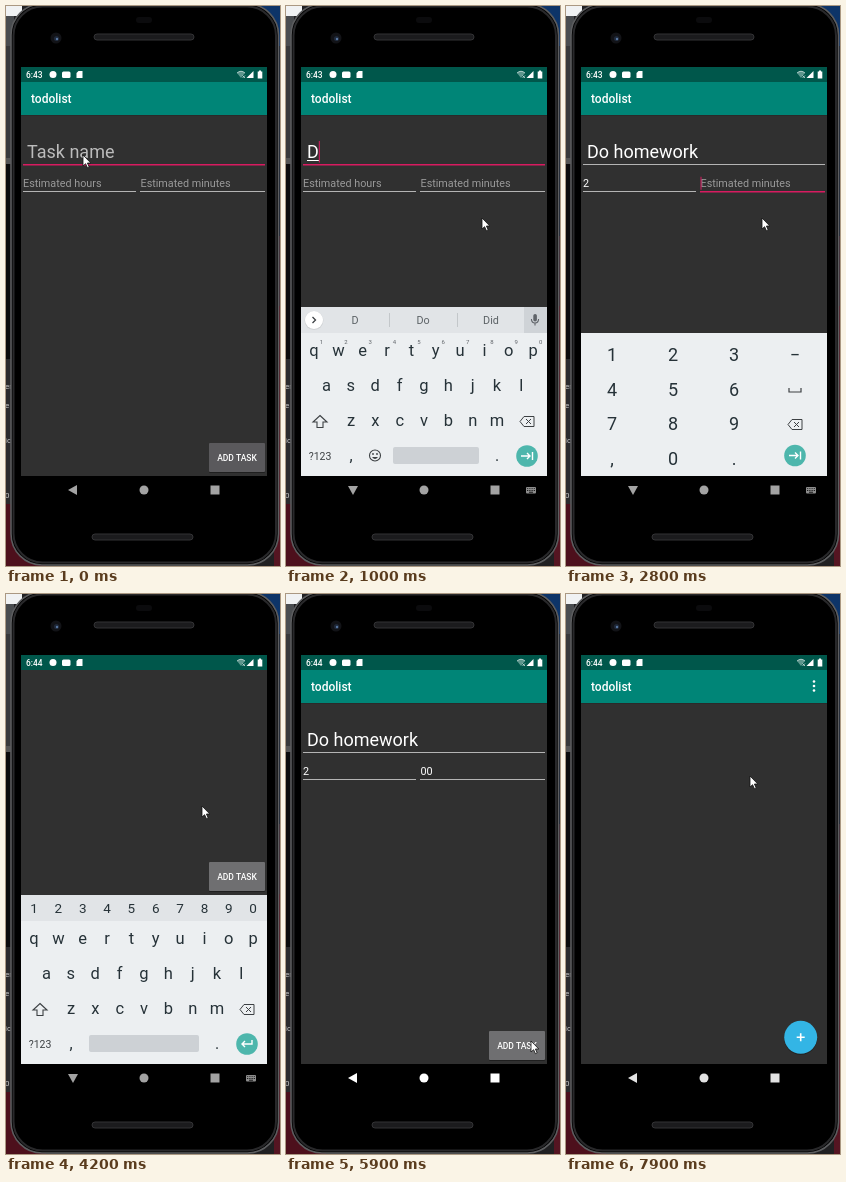
Animation of 274 by 560 pixels, one loop 8000 ms. Source, as an HTML page with a canvas:

```html
<!DOCTYPE html>
<html lang="en">
<head>
<meta charset="utf-8">
<title>Adding a task</title>
<style>
html, body { margin: 0; width: 100%; height: 100%; overflow: hidden; background: #000; }
canvas { display: block; width: 274px; height: 560px; }
</style>
</head>
<body>
<canvas id="stage"></canvas>
<script>
const LOOP = 8000, W = 274, H = 560;
const dpr = window.devicePixelRatio || 1;
const INK = '#3c4043', PINK = '#d81b60', TEAL = '#4db6ac';

function setup(canvas) {
  canvas.width = W * dpr;
  canvas.height = H * dpr;
  const ctx = canvas.getContext('2d');
  ctx.scale(dpr, dpr);
  return ctx;
}
const buffer = setup(document.createElement('canvas'));
let c = setup(document.getElementById('stage'));

// Drawing helpers
const clamp = v => Math.max(0, Math.min(1, v));
const span = (t, a, b) => clamp((t - a) / (b - a));
const smooth = k => k * k * (3 - 2 * k);

function box(x, y, w, h, fill, r = 0, stroke, lw = 1) {
  c.beginPath();
  c.roundRect(x, y, w, h, r);
  if (fill) { c.fillStyle = fill; c.fill(); }
  if (stroke) { c.strokeStyle = stroke; c.lineWidth = lw; c.stroke(); }
}
function dot(x, y, r, fill) {
  c.beginPath();
  c.arc(x, y, r, 0, 7);
  c.fillStyle = fill;
  c.fill();
}
function text(s, x, y, size, fill, align = 'left', weight = 400) {
  c.font = `${weight} ${size}px Roboto, sans-serif`;
  c.textAlign = align;
  c.textBaseline = 'alphabetic';
  c.fillStyle = fill;
  c.fillText(s, x, y);
  return c.measureText(s).width;
}
function shape(d, x, y, fill, stroke, lw = 1) {
  layer(() => {
    c.translate(x, y);
    const p = new Path2D(d);
    if (fill) { c.fillStyle = fill; c.fill(p); }
    if (stroke) { c.strokeStyle = stroke; c.lineWidth = lw; c.stroke(p); }
  });
}
function layer(draw, alpha = 1) {
  c.save();
  c.globalAlpha *= alpha;
  draw();
  c.restore();
}
// Fades a whole drawing as one surface
function group(draw, alpha) {
  const main = c;
  c = buffer;
  c.clearRect(0, 0, W, H);
  draw();
  c = main;
  layer(() => c.drawImage(buffer.canvas, 0, 0, W, H), alpha);
}
function clip(x, y, w, h) {
  c.beginPath();
  c.rect(x, y, w, h);
  c.clip();
}

// Desktop and phone body
function drawDesk() {
  box(0, 0, W, H, '#202022');
  box(0, 0, 16, 10, '#f0f2f3');
  box(0, 10, 8, 30, '#4a4d50');
  box(0, 40, 8, 112, '#38393b');
  box(0, 152, 8, 6, '#555');
  box(0, 158, 8, 195, '#0b0b0c');
  box(0, 353, 8, 145, '#2b2b2d');
  box(0, 498, 40, 62, '#4d101c');
  [['er', 383], ['e', 402], ['ic', 437], ['0', 492]].forEach(([s, y]) => text(s, -1, y, 8, '#c8c8c8'));
  box(250, 0, 24, 40, '#0d3468');
  box(268, 40, 6, 190, '#101a2c');
  box(268, 230, 6, 70, '#3a2430');
  box(268, 300, 6, 260, '#551522');
}
function drawPhone() {
  box(5, -2, 267.5, 561, '#000', 31, '#5c5d5f', 1.6);
  box(7.5, .5, 262.5, 556, null, 29, '#29292b', 2);
  dot(50, 32, 5.5, '#121317');
  dot(50.5, 32.5, 2.6, '#1f2838');
  dot(51, 33, 1.2, '#5876a0');
  box(130, 11, 16, 6, '#0b0b0d', 3);
  box(88, 28, 100, 6, '#1b1b1d', 3, '#333335');
  box(86, 528, 101, 6, '#1b1b1d', 3, '#333335');
}

function drawStatus(t) {
  box(15, 61, 246, 15, '#00574b');
  text(t < 3300 ? '6:43' : '6:44', 20, 72, 8.4, '#fff', 'left', 500);
  dot(47, 68.5, 3.5, '#fff');
  box(56, 65.5, 8.5, 6.5, '#fff', 1.5);
  shape('M-1 -3.5H3V3.5H-3V-1.5Z', 73.5, 68.5, '#fff');
  shape('M-4 -1.5Q0 -5 4 -1.5L0 3.5Z', 235, 68.5, '#5d968d');
  shape('M-4 -1.5Q0 -5 4 -1.5M1.5 1L4 3.5M4 1L1.5 3.5', 235, 68.5, null, '#d5e4e2', .8);
  shape('M3.5 -3.5V3.5H-3.5Z', 244, 68.5, '#fff');
  shape('M-1 -4H1V-3H2.3V4H-2.3V-3H-1Z', 254, 68.5, '#fff');
}

// App screens
function drawBar() {
  box(15, 76, 246, 394, '#303030');
  box(15, 76, 246, 33, '#008577');
  box(15, 109, 246, 1, 'rgba(0,0,0,.12)');
  text('todolist', 25, 97, 12, '#fff', 'left', 500);
}
function field(value, hint, x, base, size, line, x1, x2, focused, caret) {
  const w = text(value || hint, x, base, size, value ? '#fff' : size > 12 ? '#bcbcbc' : '#999');
  box(x1, line, x2 - x1, focused ? 1.6 : 1, focused ? PINK : '#b4b4b4');
  if (caret) box(x + (value ? w : 0), base - size * .95, 1, size * 1.2, PINK);
}
function drawForm(t) {
  const focus = t < 2000 ? 0 : t < 2800 ? 1 : t < 3600 ? 2 : 3;
  const name = t < 1000 ? '' : 'Do homework'.slice(0, 1 + Math.floor((t - 1000) / 90));
  drawBar();
  field(name, 'Task name', 21, 152, 18, 158, 17, 259, focus === 0, focus === 0 && t > 200);
  if (name && focus === 0) {
    const from = name.lastIndexOf(' ') + 1;
    c.font = '400 18px Roboto, sans-serif';
    const start = c.measureText(name.slice(0, from)).width;
    box(21 + start, 154, c.measureText(name.slice(from)).width, 1, '#fff');
  }
  field(t < 2500 ? '' : '2', 'Estimated hours', 17, 181, 10.8, 185, 17, 130, focus === 1, focus === 1);
  field(t < 3000 ? '' : t < 3100 ? '0' : '00', 'Estimated minutes', 134.5, 181, 10.8, 185, 134, 259, focus === 2, focus === 2);
  box(203, 438, 56, 29, 'rgba(0,0,0,.35)', 1);
  box(203, 437, 56, 29, focus === 3 ? '#6f6f71' : '#5a595c', 1);
  if (t > 6000) {
    layer(() => {
      clip(203, 437, 56, 29);
      dot(246, 450, 50 * span(t, 6000, 6250), '#fff');
    }, .25 * (1 - span(t, 6250, 6500)));
  }
  text('ADD TASK', 231, 455, 8.5, '#fff', 'center', 500);
}
function drawList() {
  drawBar();
  [87.5, 92, 96.5].forEach(y => dot(248, y, 1.3, '#fff'));
  dot(234.7, 444.5, 16.5, 'rgba(0,0,0,.25)');
  dot(234.7, 443.3, 16.5, '#33b5e5');
  shape('M-4 0H4M0 -4V4', 234.7, 443.3, null, '#fff', 1.6);
}

// Keyboard
function backspace(x, y) {
  shape('M-7 0L-3 -5H7V5H-3ZM-1 -2.5L4 2.5M4 -2.5L-1 2.5', x, y, null, INK);
}
function action(x, y, enter) {
  dot(x, y, 10.8, TEAL);
  shape(enter ? 'M5 -4V0H-5M-2 -3L-5 0L-2 3' : 'M-6 0H3M0 -3L3 0L0 3M5.5 -4V4', x, y, null, '#fff', 1.4);
}
function suggestions(t) {
  if (t < 1000) return [];
  if (t < 1090) return ['D', 'Do', 'Did'];
  if (t < 1270) return ['Do', 'Does', 'Done'];
  if (t < 1540) return ['home', 'how', 'house'];
  return ['homework', 'home', 'homes'];
}
function drawNumbers() {
  box(15, 327, 246, 143, '#eceff1');
  ['123−', '456', '789', ',0.'].forEach((row, j) => [...row].forEach((ch, i) =>
    text(ch, 46 + 61 * i, 355 + 34.7 * j, 18, '#263238', 'center')));
  shape('M-6 -2V2H6V-2', 229, 384, null, INK, 1.2);
  backspace(229, 418.5);
  action(229, 449.5, false);
}
function drawLetters(t, digits) {
  const row = (keys, x, y, size) => [...keys].forEach((ch, i) =>
    text(ch, x + 24.35 * i, y, size, '#263238', 'center'));
  box(15, 301, 246, 169, '#eceff1');
  box(15, 301, 246, 26, '#e1e4e7');
  if (digits) {
    row('1234567890', 28, 319, 13.5);
  } else {
    box(238, 301, 23, 26, '#cfd3d7');
    dot(28, 314.5, 9.5, 'rgba(0,0,0,.08)');
    dot(28, 314, 9, '#fff');
    shape('M-1.5 -3L1.5 0L-1.5 3', 28, 314, null, INK, 1.3);
    suggestions(t).forEach((s, i) => text(s, 69 + 68 * i, 318, 10.8, '#5c6266', 'center'));
    [103, 171].forEach(x => box(x, 307, 1, 14, '#c3c7ca'));
    box(247.3, 308, 3.6, 7.5, '#5f6368', 1.8);
    shape('M-3.6 -1Q-3.4 3 0 3Q3.4 3 3.6 -1M0 3V5.5', 249, 314, null, '#5f6368', 1.1);
    [...'1234567890'].forEach((n, i) => text(n, 35.5 + 24.35 * i, 338, 6, '#5f6368', 'center'));
  }
  row('qwertyuiop', 28, 350, 16.5);
  row('asdfghjkl', 40.5, 385, 16.5);
  row('zxcvbnm', 65, 420, 16.5);
  shape('M0 -6.5L7 0H3V5.5H-3V0H-7Z', 34, 416, null, INK, 1.1);
  backspace(241, 415.5);
  text('?123', 34, 453.5, 10.5, INK, 'center');
  row(',', 65, 455, 16);
  row('.', 211, 455, 16);
  const left = digits ? 83 : 107;
  box(left, 441, 193 - left, 17, '#cdd1d5', 2);
  if (!digits) {
    c.beginPath();
    c.arc(89, 449.5, 5.5, 0, 7);
    c.strokeStyle = INK;
    c.lineWidth = 1.1;
    c.stroke();
    dot(87, 448, .9, INK);
    dot(91, 448, .9, INK);
    shape('M-3 1Q0 5 3 1Z', 89, 450, INK);
  }
  action(241, 450, digits);
}
function drawKeyboard(t) {
  const rise = span(t, 100, 400), fall = span(t, 5100, 5400);
  if (rise === 0 || fall === 1) return;
  layer(() => {
    c.translate(0, 30 * (1 - rise) ** 2 + 30 * fall);
    const keys = t >= 2100 && t < 3700 ? drawNumbers : () => drawLetters(t, t >= 3700);
    group(keys, rise * (1 - fall ** 1.5));
  });
}

function drawNav(t) {
  const open = span(t, 150, 400) * (1 - span(t, 5100, 5400));
  const tint = t < 5100 ? '#a3a3a3' : t < 6600 ? '#fff' : '#e2e2e2';
  if (t >= 5100) layer(() => box(35, 470, 63, 29, '#fff', 14), .27 * (1 - span(t, 5300, 5600)));
  layer(() => {
    c.translate(67, 484);
    c.rotate(-Math.PI / 2 * open);
    shape('M-5 0L4 -5V5Z', 0, 0, tint);
  });
  dot(138, 484, 4.5, tint);
  box(204.5, 479.5, 9, 9, tint);
  if (t > 300 && t < 5200) {
    box(240, 481, 10, 6.5, '#8d8d8d', 1);
    for (let i = 0; i < 8; i++) box(241.2 + 2.2 * (i % 4), 482.2 + 1.8 * (i >> 2), 1, .9, '#000');
    box(243, 485.8, 4, .8, '#000');
  }
}

// Pointer path: time, x, y
const STOPS = [[0, 77, 149], [250, 77, 149], [850, 196, 212], [4200, 196, 212], [5000, 65, 484],
  [5400, 65, 484], [5850, 245, 447], [6700, 245, 447], [7700, 184, 182], [LOOP, 184, 182]];
function drawPointer(t) {
  const i = STOPS.findIndex(s => s[0] > t);
  const [t0, x0, y0] = STOPS[i - 1], [t1, x1, y1] = STOPS[i];
  const k = smooth(span(t, t0, t1));
  shape('M0 0V11L2.6 8.7L4.4 12.7L6.2 11.9L4.4 8H7.8Z', x0 + (x1 - x0) * k, y0 + (y1 - y0) * k, '#fff', '#111', .8);
}

// The form scrolls up while its button has focus above the keyboard
function panAt(t) {
  const k = t < 5100 ? smooth(span(t, 3700, 4000)) : (1 - span(t, 5100, 5400)) ** 2.7;
  return Math.round(-169 * k);
}

function draw(t) {
  drawDesk();
  drawPhone();
  layer(() => {
    clip(15, 61, 246, 409);
    const swap = span(t, 6350, 6600);
    if (swap < 1) layer(() => { c.translate(0, panAt(t)); drawForm(t); });
    if (swap > 0) group(drawList, swap);
  });
  drawStatus(t);
  layer(() => { clip(15, 61, 246, 434); drawKeyboard(t); });
  drawNav(t);
  drawPointer(t);
}

function tick() {
  draw(performance.now() % LOOP);
  requestAnimationFrame(tick);
}
tick();
</script>
</body>
</html>
```
